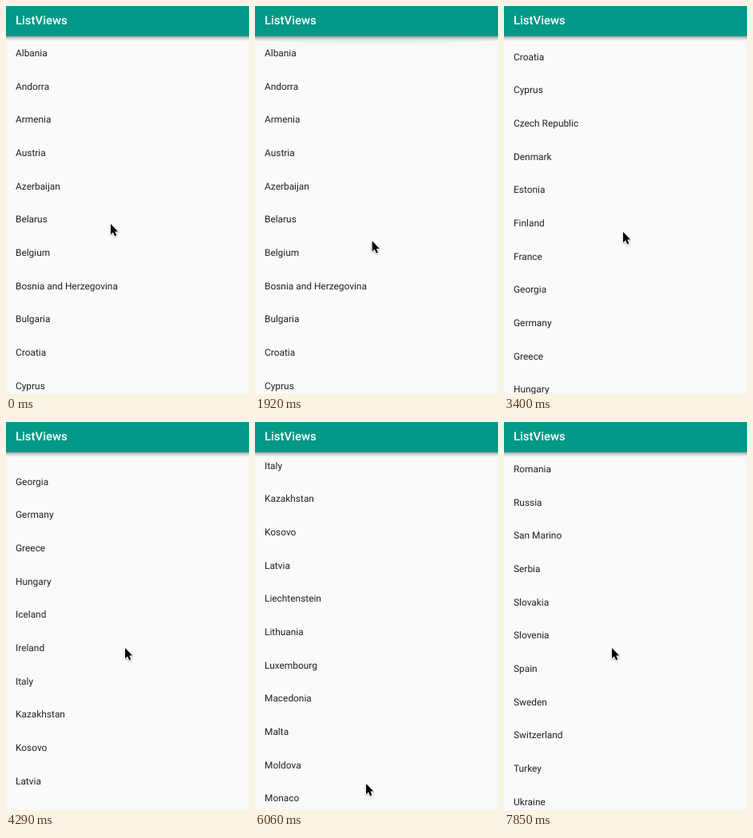
Write an HTML page that moves like this. It is 304 px wide and 486 px high and loops after 8 s.

```html
<!DOCTYPE html>
<html lang="en">
<head>
<meta charset="utf-8">
<title>ListViews</title>
<style>
  html, body { margin: 0; width: 100%; height: 100%; overflow: hidden; background: #fafafa; }
  svg { display: block; width: 100vw; height: 100vh; }
  text { font-family: Roboto, sans-serif; text-rendering: geometricPrecision; }
  #list { font-size: 11.9px; fill: #212121; }
  #bar { fill: #009987; filter: drop-shadow(0 2px 2px rgba(0, 0, 0, .4)); }
  #title { font-size: 14.9px; font-weight: 500; fill: #fff; }
  #glow { fill: #009688; }
  #cursor { filter: drop-shadow(0 1px 1px rgba(0, 0, 0, .3)); }
  #cursor path { fill: #000; stroke: #fff; stroke-width: 1.6; stroke-linejoin: round; paint-order: stroke; }
</style>
</head>
<body>
<svg viewBox="0 0 304 486">
  <rect width="304" height="486" fill="#fafafa"/>
  <g id="list"></g>
  <path id="glow"/>
  <rect id="bar" x="-8" y="-8" width="320" height="46"/>
  <text id="title" x="12" y="23">ListViews</text>
  <g id="cursor"><path d="M1 2V15.2L4 12.4 6.1 17.3 8.3 16.4 6.3 11.6H10.2Z"/></g>
</svg>
<script>
const countries = `Albania,Andorra,Armenia,Austria,Azerbaijan,Belarus,Belgium,Bosnia and Herzegovina,
Bulgaria,Croatia,Cyprus,Czech Republic,Denmark,Estonia,Finland,France,Georgia,Germany,Greece,Hungary,
Iceland,Ireland,Italy,Kazakhstan,Kosovo,Latvia,Liechtenstein,Lithuania,Luxembourg,Macedonia,Malta,
Moldova,Monaco,Montenegro,Netherlands,Norway,Poland,Portugal,Romania,Russia,San Marino,Serbia,Slovakia,
Slovenia,Spain,Sweden,Switzerland,Turkey,Ukraine,United Kingdom,Vatican City`.split(/,\s*/);

const LOOP = 8000, TICKS = 54, LEAD = 20;
const ROW = 41.667, FIRST = 63.05;
const BAR = 38, GLOW = 15.5;
const $ = id => document.getElementById(id);
const list = $('list'), glow = $('glow'), cursor = $('cursor');
const clamp = v => Math.min(1, Math.max(0, v));

countries.forEach((name, i) => {
  const row = document.createElementNS('http://www.w3.org/2000/svg', 'text');
  row.setAttribute('x', 12);
  row.setAttribute('y', FIRST + i * ROW);
  row.textContent = name;
  list.append(row);
});

// Times below are in screen ticks.
const home = { x: 130, y: 271 };
const moves = [
  { from: 0, to: 2, x: 136, y: 329 },
  { from: 3, to: 6, x: 141, y: 178 },
  { from: 9, to: 16, x: 149, y: 378 },
  { from: 16, to: 19, x: 149, y: 392 },
  { from: 20, to: 23, x: 148, y: 281 },
  { from: 31, to: 35.5, x: 149, y: 456 },
  { from: 36, to: 38, x: 144, y: 292 },
  { from: 38, to: 41, x: 138, y: 451 },
  { from: 42, to: 45, x: 134, y: 281 }
];

// Each fling covers its distance with exponential friction.
const flings = [
  { start: 20.733, distance: 694, friction: .3367 },
  { start: 36.8, distance: 228, friction: 1.6 },
  { start: 42.8, distance: 663.7, friction: .55 }
];

function pointer(k) {
  let { x, y } = home;
  for (const m of moves) {
    const f = clamp((k - m.from) / (m.to - m.from));
    x += (m.x - x) * f;
    y += (m.y - y) * f;
  }
  return `${x} ${y}`;
}

const scroll = k => flings.reduce((sum, { start, distance, friction }) =>
  sum + distance * (1 - Math.exp(-friction * Math.max(0, k - start))), 0);

// Overscroll glow grows with the downward drag and ends on release.
const pull = k => k < 17 ? GLOW * clamp((k - 10) / 5) : 0;

function draw(k) {
  const h = pull(k), side = BAR + h * .58, mid = BAR + h * 1.42;
  cursor.setAttribute('transform', `translate(${pointer(k)})`);
  list.setAttribute('transform', `translate(0 ${-scroll(k)})`);
  glow.setAttribute('d', `M0 ${BAR}V${side}Q152 ${mid} 304 ${side}V${BAR}Z`);
  glow.setAttribute('fill-opacity', h / 150);
}

let shown = -1;
function frame(now) {
  const k = Math.floor((now + LEAD) % LOOP / LOOP * TICKS);
  if (k !== shown) draw(shown = k);
  requestAnimationFrame(frame);
}
draw(0);
requestAnimationFrame(frame);
</script>
</body>
</html>
```
